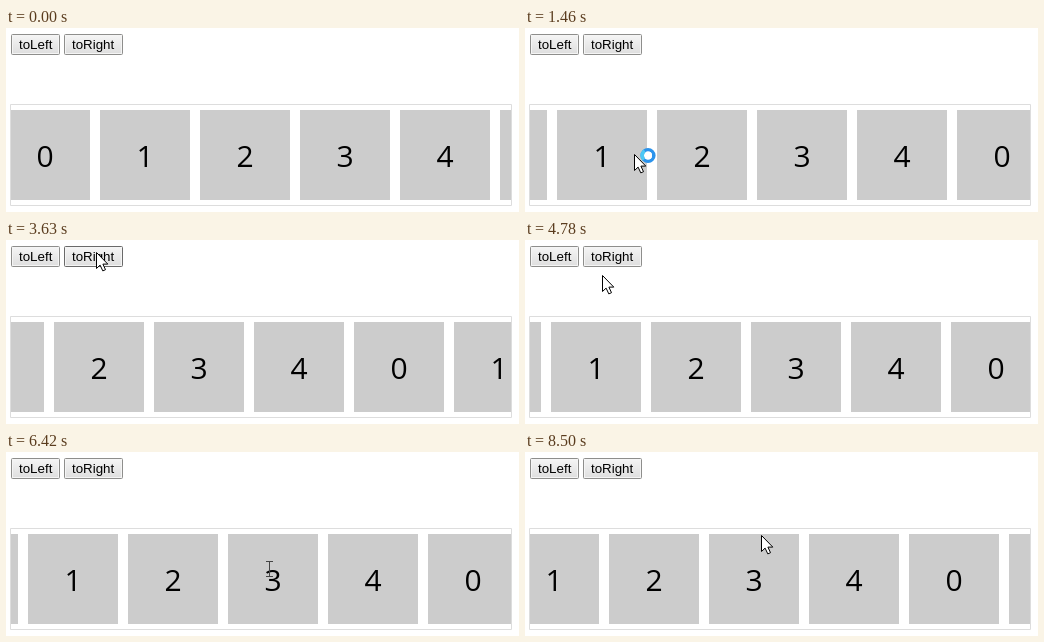
Write an HTML page with a canvas that moves like this. It is 513 by 184 pixels and loops after 8.97 s.

```html
<!DOCTYPE html>
<html lang="en">
<head>
<meta charset="utf-8">
<title>Carousel</title>
<style>
  html, body { margin: 0; width: 100%; height: 100%; overflow: hidden; background: #fff; }
  canvas { display: block; width: 513px; height: 184px; }
</style>
</head>
<body>
<canvas id="stage" width="513" height="184"></canvas>
<script>
const ctx = document.getElementById('stage').getContext('2d');
const LOOP = 8970;
const REFRESH = 77.3;
const TILE = 90, PITCH = 100;
const SPEED = 1 / 14.8; // px per ms

// Direction of the strip from each time on; it rests while hovered
const turns = [
  [30, -1], [948, 0], [2232, -1], [3550.5, 1], [5435, -1],
  [6149, 0], [7720, -1], [8282, 0]
];

// Pointer stops: time, x, y
const stops = [
  [840, 112, 186], [1150, 109, 130], [1460, 109, 126], [1920, 196, 113],
  [2120, 196, 113], [2620, 222, 40], [3250, 125, 0], [3560, 90, 12],
  [3940, 90, 12], [4780, 77, 35], [5300, 33, 14], [5500, 33, 14],
  [6400, 263, 117], [7040, 263, 117], [7110, 262, 109], [7180, 249, 104],
  [7600, 249, 104], [7720, 246, 180], [8200, 240, 190], [8490, 236, 83]
];

// The picture refreshes on a fixed beat
function snap(t) {
  const beat = Math.floor((t - 62) / REFRESH);
  return beat < 0 ? 0 : 70 + beat * REFRESH;
}

function stripLeft(t) {
  let x = -6;
  turns.forEach(([from, dir], i) => {
    const to = i + 1 < turns.length ? turns[i + 1][0] : LOOP;
    x += dir * SPEED * Math.max(0, Math.min(t, to) - from);
  });
  return Math.round(x);
}

function pointerAt(t) {
  const i = stops.findIndex(s => s[0] > t);
  if (i < 1) return stops.at(i).slice(1);
  const [t0, x0, y0] = stops[i - 1], [t1, x1, y1] = stops[i];
  const p = (t - t0) / (t1 - t0);
  const e = p * p * (3 - 2 * p);
  return [Math.round(x0 + (x1 - x0) * e), Math.round(y0 + (y1 - y0) * e)];
}

function strokeBox(x, y, w, h, r, color) {
  ctx.beginPath();
  ctx.roundRect(x + 0.5, y + 0.5, w - 1, h - 1, r);
  ctx.lineWidth = 1;
  ctx.strokeStyle = color;
  ctx.stroke();
}

function drawButton(label, x, w, px, py) {
  const hover = px >= x && px < x + w && py >= 6 && py < 27;
  const fill = ctx.createLinearGradient(0, 6, 0, 27);
  fill.addColorStop(0, '#f6f6f6');
  fill.addColorStop(1, '#dddddd');
  ctx.fillStyle = fill;
  ctx.fillRect(x + 1, 7, w - 2, 19);
  strokeBox(x + 1, 7, w - 2, 19, 0, '#f5f5f5');
  strokeBox(x, 6, w, 21, 1, hover ? '#6a6a6a' : '#8e8e8c');
  ctx.fillStyle = '#000';
  ctx.font = '13.333px "Liberation Sans", Arial, sans-serif';
  ctx.textAlign = 'left';
  ctx.fillText(label, x + 8, 21);
}

function drawCarousel(left) {
  strokeBox(4, 76, 502, 102, 0, '#ddd');
  ctx.save();
  ctx.beginPath();
  ctx.rect(5, 77, 500, 100);
  ctx.clip();
  ctx.font = '30px "Open Sans", "Noto Sans", sans-serif';
  ctx.textAlign = 'center';
  for (let i = 0; i < 8; i++) {
    const x = left + i * PITCH;
    ctx.fillStyle = '#ccc';
    ctx.fillRect(x, 82, TILE, TILE);
    ctx.fillStyle = '#000';
    ctx.fillText(i % 5, x + TILE / 2, 139);
  }
  ctx.restore();
}

function drawArrow(x, y) {
  ctx.save();
  ctx.translate(x + 0.5, y + 0.5);
  ctx.fillStyle = '#fff';
  ctx.strokeStyle = '#000';
  ctx.lineWidth = 1;
  const arrow = new Path2D('M0 0V16L3.6 12.6L6.3 18.4L9 17.2L6.4 11.6H11.3Z');
  ctx.fill(arrow);
  ctx.stroke(arrow);
  ctx.restore();
}

function drawRing(x, y) {
  const arc = (from, to, color) => {
    ctx.beginPath();
    ctx.arc(x, y, 5.8, from * Math.PI, to * Math.PI);
    ctx.strokeStyle = color;
    ctx.stroke();
  };
  ctx.lineWidth = 3.6;
  ctx.fillStyle = '#fff';
  arc(0, 2, '#2b93ec');
  ctx.beginPath();
  ctx.arc(x, y, 4, 0, Math.PI * 2);
  ctx.fill();
  arc(0.75, 1.3, '#4cc8f4');
}

function drawBeam(x, y) {
  ctx.lineWidth = 1;
  ctx.strokeStyle = '#444';
  ctx.translate(x + 0.5, y);
  ctx.stroke(new Path2D('M-3.5 -7.5H3.5M0 -7V8M-3.5 7.5H3.5'));
  ctx.resetTransform();
}

function draw(time) {
  const t = snap(time);
  const [px, py] = pointerAt(t);
  ctx.fillStyle = '#fff';
  ctx.fillRect(0, 0, 513, 184);
  drawButton('toLeft', 5, 49, px, py);
  drawButton('toRight', 58, 59, px, py);
  drawCarousel(stripLeft(t));
  if (t > 6380 && t < 7080) drawBeam(px, py);
  else drawArrow(px, py);
  if (t > 1450 && t < 1680) drawRing(px + 14, py + 1.5);
}

const begin = performance.now();
function tick() {
  draw((performance.now() - begin) % LOOP);
  requestAnimationFrame(tick);
}
tick();
</script>
</body>
</html>
```
